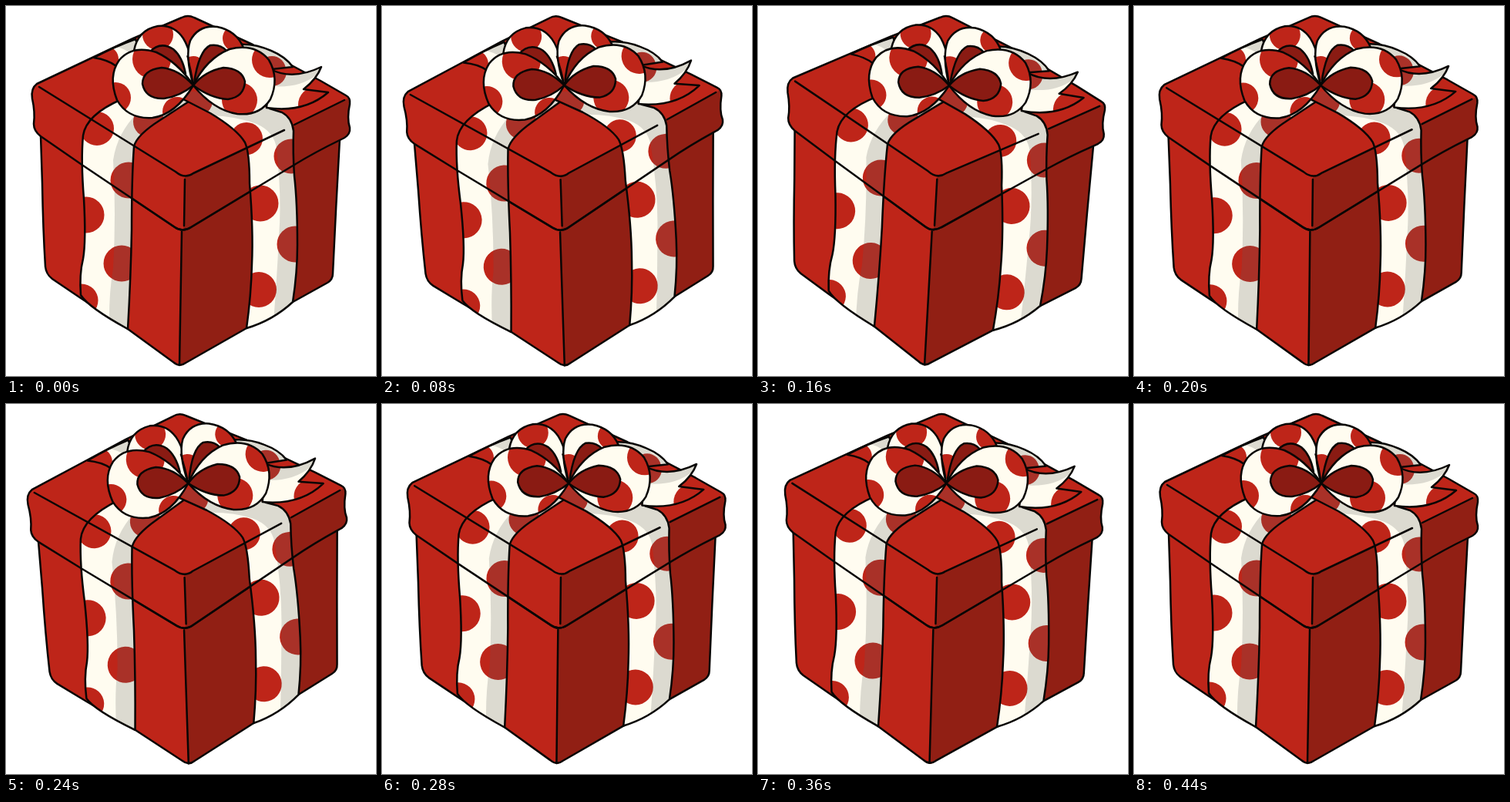
Animation, 480 px wide and 480 px high, one loop 960 ms. Source, as an HTML page with a canvas:

```html
<!DOCTYPE html>
<html>
<head>
<meta charset="utf-8">
<style>
html, body { margin: 0; height: 100%; overflow: hidden; background: #fff; }
canvas { display: block; width: 100vmin; height: 100vmin; }
</style>
</head>
<body>
<canvas id="stage" width="480" height="480"></canvas>
<script>
const ctx = document.getElementById('stage').getContext('2d');
const RED = '#be2519', DARK = '#911f14', INNER = '#8a1b13', CREAM = '#fffcf0';
const SHADE = 'rgba(92,92,92,.215)';
const LOOP = 960, STEP = 40;

function fill(d, color) {
  ctx.fillStyle = color;
  ctx.fill(new Path2D(d));
}

function line(d, width = 2.5) {
  ctx.lineWidth = width;
  ctx.stroke(new Path2D(d));
}

// Cream cloth with clipped dots [x, y, radius], an optional shadow and an outline.
function cloth(d, dots, shadow, outline = d) {
  ctx.save();
  ctx.clip(new Path2D(d));
  fill(d, CREAM);
  ctx.fillStyle = RED;
  for (const [x, y, r] of dots) {
    ctx.beginPath();
    ctx.arc(x, y, r, 0, 7);
    ctx.fill();
  }
  if (shadow) fill(shadow, SHADE);
  ctx.restore();
  line(outline);
}

function leaf(d) {
  fill(d, INNER);
  line(d);
}

function drawBox() {
  const body = 'M45 168L47 230Q48 290 51 338Q52 348 60 354L97 379L158 419L217 462Q225 469 233 463L312 418L372 384L417 359Q424 355 424 347Q428 260 433 172L230 150Z';
  const lid = 'M228 15Q236 11 244 15L320 50L408 97L441 116Q447 119 446 127Q442 146 446 158Q447 166 439 171L433 174Q402 189 374 206L240 287Q229 294 219 287L100 207L45 169Q36 162 36 153Q38 138 34 120Q32 107 40 101L114 66L165 42Z';
  fill(body, RED);
  fill('M229 285L225 467Q229 467 233 463L312 418L417 359Q424 355 424 347Q428 260 433 172Z', DARK);
  line(body);
  fill(lid, RED);
  fill('M232 221Q238 221 243 217L361 161L443 120Q447 121 446 127Q442 146 446 158Q447 166 439 171L374 206L240 287Q235 291 230 291Z', DARK);
  line(lid);
}

function drawRibbons() {
  cloth('M114 67Q140 53 168 43L176 66L143 78Q133 70 114 67Z', [[129, 69, 17]],
    'M142 53L170 40L178 68L162 62Q154 55 142 53Z');
  cloth('M300 50Q322 48 344 58Q363 66 372 79L345 82L318 72Z', [[345, 83, 18]],
    'M298 45Q340 50 376 82L340 84Q330 65 298 45Z');

  const leftEdge = 'Q104 141 100 168Q97 200 101 250Q104 305 100 328Q95 348 97 375Q107 391 158 419Q162 350 163 290Q163 225 166 182Q170 167 200 148L240 122';
  cloth('M150 121' + leftEdge + 'L245 100Z',
    [[118, 159, 22], [185, 150, 20], [159, 226, 23.5], [104, 271, 23.5], [150, 334, 23.5], [98, 382, 21.5]],
    'M171 138Q144 165 139 200Q143 270 139 340Q133 375 134 420L170 425L180 180L260 130L245 100Z',
    'M150 121' + leftEdge);

  const rightEdge = 'M228 120L265 139Q300 160 310 177Q316 190 316 230Q321 290 319 335Q318 375 312 418Q346 408 372 384Q378 345 378 310Q378 255 374 220Q372 190 373 162Q371 145 358 138L342 133';
  cloth(rightEdge + 'L245 100Z',
    [[249, 123, 19], [312, 172, 21], [370, 195, 22.5], [330, 256, 23.5], [375, 309, 23.5], [328, 368, 23]],
    'M222 110L264 142Q300 143 325 153Q348 163 351 185Q358 250 354 300Q351 360 347 410L390 400L390 130L340 115Z',
    rightEdge);

  line('M43 105L220 215Q232 225 243 217L361 161');
  line('M374 154L439 122');
  line('M100 207L219 287Q229 294 240 287L374 206');
  line('M232 225L231 285');
  line('M228 293L225 466');
}

function drawBow() {
  cloth('M343 82Q372 97 409 79Q403 95 386 108L418 112Q387 139 338 132Z',
    [[345, 85, 19], [402, 128, 23]],
    'M340 80Q376 98 409 79L402 90Q380 107 344 104Z');

  cloth('M243 103Q243 63 230 42Q218 24 197 26Q171 31 166 58Q210 60 243 103Z',
    [[197, 37, 20]]);
  leaf('M186 60Q200 45 217 56Q229 66 233 88L215 85Z');

  cloth('M243 103Q232 65 239 45Q250 24 274 27Q299 32 308 54Q265 57 243 103Z',
    [[243, 81, 16], [298, 42, 17]]);
  leaf('M244 100Q250 58 265 51Q278 49 286 58L275 80Z');

  cloth('M243 103Q223 73 195 60Q164 50 147 70Q132 91 144 122Q158 147 190 145Q220 141 243 103Z',
    [[189, 69, 25], [142, 119, 20], [222, 137, 19]]);
  leaf('M243 103Q224 82 202 80Q177 83 177 101Q181 121 205 120Q226 117 243 103Z');

  cloth('M243 103Q260 68 290 56Q323 48 341 70Q355 94 343 121Q329 143 300 140Q269 135 243 103Z',
    [[342, 70, 23], [303, 122, 23]]);
  leaf('M243 103Q257 85 282 80Q306 81 310 98Q309 118 288 121Q266 120 243 103Z');
  line('M235 65Q241 84 243 103', 1.6);
}

// Shake between -2.9 and 2.2 degrees, then settle.
function angleAt(ms) {
  const t = Math.floor(ms / STEP) * STEP;
  if (t <= 80) return -2.9 * t / 80;
  if (t <= 320) return -0.35 - 2.55 * Math.cos((t - 80) / 80 * Math.PI);
  return t < 440 ? 2.2 * Math.pow(0.28, (t - 320) / STEP) : 0;
}

function frame() {
  ctx.setTransform(1, 0, 0, 1, 0, 0);
  ctx.fillStyle = '#fff';
  ctx.fillRect(0, 0, 480, 480);
  ctx.translate(238, 233);
  ctx.rotate(angleAt(performance.now() % LOOP) * Math.PI / 180);
  ctx.translate(-238, -233);
  ctx.strokeStyle = '#080605';
  ctx.lineCap = ctx.lineJoin = 'round';
  drawBox();
  drawRibbons();
  drawBow();
  requestAnimationFrame(frame);
}
frame();
</script>
</body>
</html>
```
